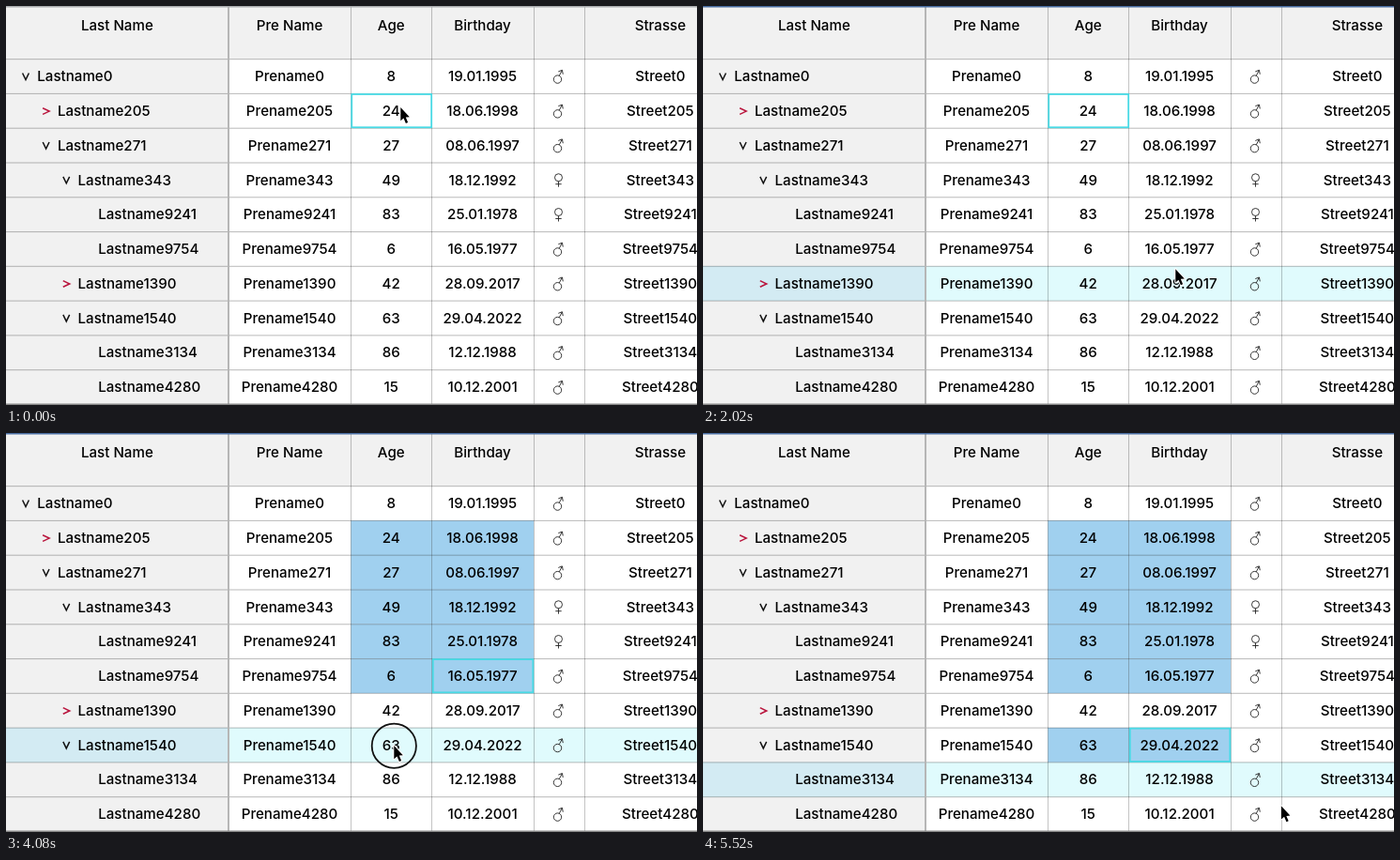
An HTML page with a canvas that plays this animation: 736x425 px, repeating every 5.54 s.

```html
<!DOCTYPE html>
<html lang="en">
<head>
<meta charset="utf-8">
<title>Tree table selection</title>
<style>
html, body { margin: 0; width: 100%; height: 100%; overflow: hidden; background: #fff; }
canvas { display: block; width: 736px; height: 425px; }
</style>
</head>
<body>
<canvas id="stage" width="736" height="425"></canvas>
<script>
const ctx = document.getElementById('stage').getContext('2d');
const LOOP = 5540, HOVER_LAG = 45, PRESS_TIME = 220;
const SCALE = 1.0817, TOP = 56.5, ROW = 34 * SCALE, INDENT = 20 * SCALE;

const HEADERS = ['Last Name', 'Pre Name', 'Age', 'Birthday', '', 'Strasse'];
const edges = [0];
for (const width of [219.6, 120, 80, 100, 50, 150]) edges.push(edges.at(-1) + width * SCALE);

// Leading dots give the tree depth.
const rows = `
v 0 8 19.01.1995 m
.> 205 24 18.06.1998 m
.v 271 27 08.06.1997 m
..v 343 49 18.12.1992 f
...- 9241 83 25.01.1978 f
...- 9754 6 16.05.1977 m
..> 1390 42 28.09.2017 m
..v 1540 63 29.04.2022 m
...- 3134 86 12.12.1988 m
...- 4280 15 10.12.2001 m`.trim().split('\n').map(line => {
  const [tree, id, age, day, sex] = line.split(' ');
  return { depth: tree.length - 1, kind: tree.at(-1), id, age, day, sex };
});

const HOME = [420, 107];
const MOVES = [
  { from: 1690, to: 1850, goal: [503, 381] },
  { from: 1850, to: 2071, goal: [503, 264] },
  { from: 2200, to: 2400, goal: [491, 264] },
  { from: 3104, to: 3820, goal: [413, 332] },
  { from: 4240, to: 4500, goal: [503, 337] },
  { from: 5220, to: 5820, goal: [727, 455] }
];
const CLICKS = [
  { at: 0, row: 1, col: 2 },
  { at: 2520, row: 5, col: 3 },
  { at: 4120, row: 7, col: 2 },
  { at: 4760, row: 7, col: 3 }
];

const rowY = i => TOP + ROW * i;
const colWidth = c => edges[c + 1] - edges[c];
const mid = c => (edges[c] + edges[c + 1]) / 2;
const lerp = (a, b, k) => a + (b - a) * k;

function ease(k) {
  k = Math.min(1, Math.max(0, k));
  return k * k * (3 - 2 * k);
}

function pointerAt(t) {
  return MOVES.reduce(([x, y], { from, to, goal }) => {
    const k = ease((t - from) / (to - from));
    return [lerp(x, goal[0], k), lerp(y, goal[1], k)];
  }, HOME);
}

// A row lights up once the pointer has moved since the last click.
function hoveredRow(t, step) {
  const moved = MOVES.some(m => m.from > CLICKS[step].at && m.from <= t);
  return moved ? Math.floor((pointerAt(t - HOVER_LAG)[1] - TOP) / ROW) : -1;
}

function isSelected(row, col, step) {
  if (row === 7) return step >= col;
  return step >= 1 && row >= 1 && row <= 5;
}

function fill(color, x, y, w, h) {
  ctx.fillStyle = color;
  ctx.fillRect(x, y, w, h);
}

function stroke(color, width, draw) {
  ctx.strokeStyle = color;
  ctx.lineWidth = width;
  ctx.beginPath();
  draw();
  ctx.stroke();
}

function trace(...points) {
  points.forEach(([x, y], i) => i ? ctx.lineTo(x, y) : ctx.moveTo(x, y));
}

function label(text, x, y, align = 'center') {
  ctx.fillStyle = '#000';
  ctx.textAlign = align;
  ctx.fillText(text, x, y);
}

function toggle(kind, x, y) {
  if (kind === 'v') {
    stroke('#111', 1.5, () => trace([x - 3.4, y - 3.4], [x, y + 3.6], [x + 3.4, y - 3.4]));
  } else if (kind === '>') {
    stroke('#b9143c', 1.5, () => trace([x - 3.5, y - 2.9], [x + 3.5, y + .4], [x - 3.5, y + 3.7]));
  }
}

function gender(sex, x, y) {
  stroke('#222', .9, () => {
    if (sex === 'm') {
      ctx.arc(x - 1, y + 3.2, 4.2, 0, 7);
      trace([x + .8, y - .6], [x + 3.8, y - 6.4]);
      trace([x - .2, y - 5], [x + 3.9, y - 6.6], [x + 4.8, y - 2.2]);
    } else {
      ctx.arc(x, y - 2.5, 4, 0, 7);
      trace([x, y + 1.5], [x, y + 7.5]);
      trace([x - 3.2, y + 4.5], [x + 3.2, y + 4.5]);
    }
  });
}

function drawBackground(step, hovered) {
  fill('#fff', 0, 0, 736, 425);
  fill('#f1f1f1', 0, 0, 736, TOP);
  fill('#f1f1f1', 0, 0, edges[1], 425);
  if (hovered >= 0) {
    fill('#e0fbfd', 0, rowY(hovered), 736, ROW);
    fill('#d3ebf3', 0, rowY(hovered), edges[1], ROW);
  }
  rows.forEach((_, r) => [2, 3].forEach(c => {
    if (isSelected(r, c, step)) {
      fill(r === hovered ? '#8fc8ea' : '#a0d0ef', edges[c], rowY(r), colWidth(c), ROW);
    }
  }));
}

function drawGrid(t) {
  rows.forEach((_, r) => fill('rgba(0,0,0,.25)', 0, rowY(r) - .4, 736, 1.1));
  edges.slice(2, 6).forEach(x => fill('rgba(0,0,0,.23)', Math.floor(x), 0, 1, 424));
  fill('#b6b6b6', 236, 0, 2, 424);
  fill('#858585', 0, 423.5, 736, 1.5);
  const k = Math.min(1, t / 600);
  fill(`rgb(${lerp(170, 72, k)},${lerp(172, 108, k)},${lerp(175, 160, k)})`, 0, 0, 736, 1.5);
}

function drawFocus({ row, col }) {
  ctx.strokeStyle = '#48dae5';
  ctx.lineWidth = 1.8;
  ctx.strokeRect(edges[col] + .9, rowY(row) + .7, colWidth(col) - 1.6, ROW - 1.5);
}

function drawContent() {
  HEADERS.forEach((text, c) => label(text, mid(c) - .4, 26));
  rows.forEach(({ depth, kind, id, age, day, sex }, r) => {
    const y = rowY(r) + ROW / 2, base = y + 5.3;
    toggle(kind, 21 + INDENT * depth, y);
    label('Lastname' + id, 33.3 + INDENT * depth, base, 'left');
    ['Prename' + id, age, day, '', 'Street' + id].forEach((text, i) => label(text, mid(i + 1) - .4, base));
    gender(sex, mid(4) - .6, y);
  });
}

function drawPointer([x, y], pressed) {
  if (pressed) stroke('#111', 1.8, () => ctx.arc(x + .3, y + 1.3, 23.6, 0, 7));
  ctx.save();
  ctx.translate(x + .3, y + 1);
  ctx.lineJoin = 'round';
  ctx.beginPath();
  trace([0, 0], [0, 14.2], [3.2, 11.4], [5.6, 17], [7.8, 16], [5.5, 10.6], [9.5, 10.3]);
  ctx.closePath();
  ctx.strokeStyle = '#fff';
  ctx.lineWidth = 2;
  ctx.stroke();
  ctx.fillStyle = '#000';
  ctx.fill();
  ctx.restore();
}

function render(t) {
  const step = CLICKS.filter(c => c.at <= t).length - 1;
  const pressed = CLICKS.some(c => t < c.at && t >= c.at - PRESS_TIME);
  ctx.font = `500 ${14 * SCALE}px Inter, Arial, sans-serif`;
  drawBackground(step, hoveredRow(t, step));
  drawGrid(t);
  drawFocus(CLICKS[step]);
  drawContent();
  drawPointer(pointerAt(t), pressed);
}

const start = performance.now();
function tick() {
  render((performance.now() - start) % LOOP);
  requestAnimationFrame(tick);
}
tick();
</script>
</body>
</html>
```
